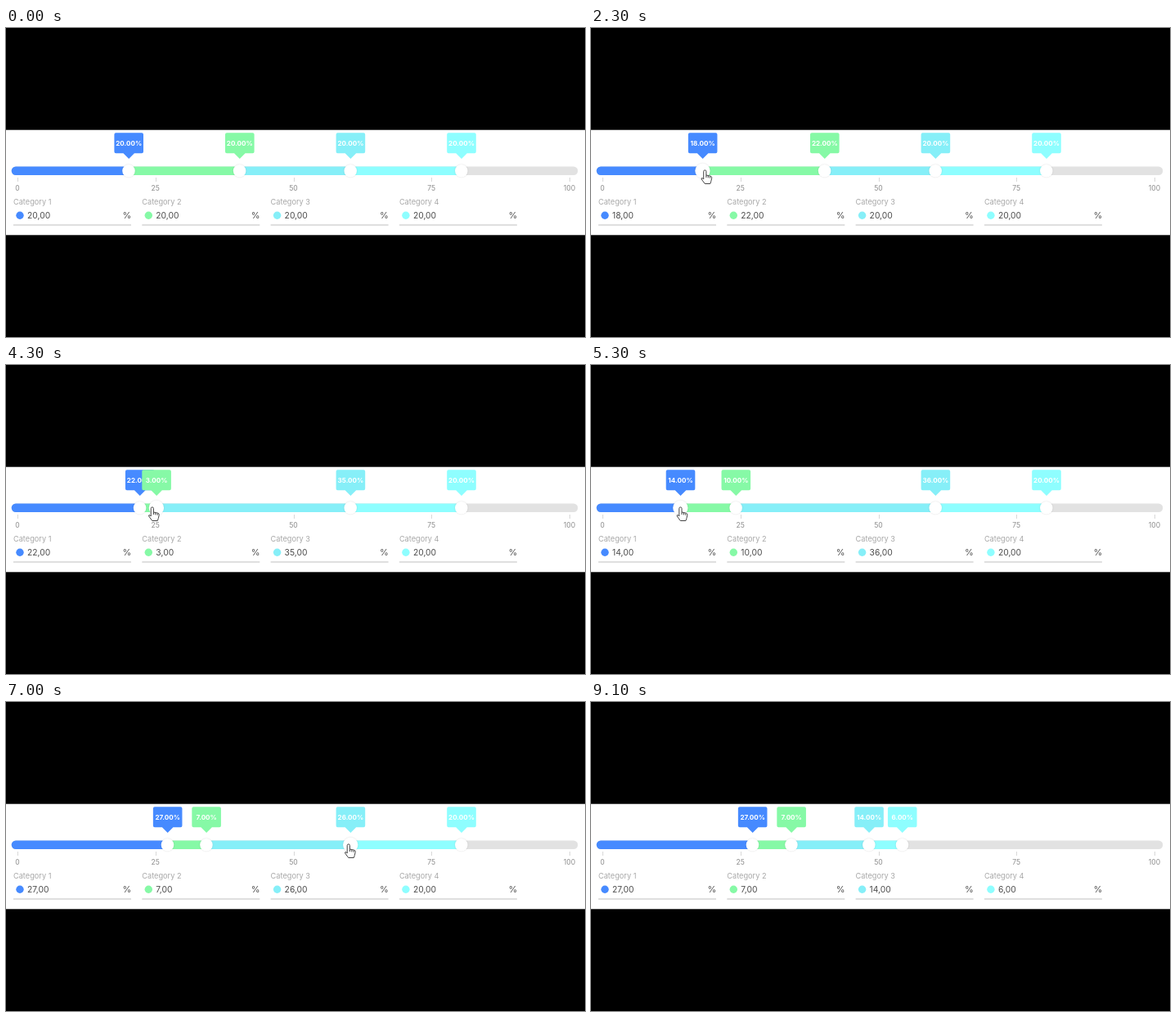
Write an HTML page with a canvas that moves like this. It is 708 by 378 pixels and loops after 9400 ms.

```html
<!DOCTYPE html>
<html lang="en">
<head>
<meta charset="utf-8">
<title>Category slider</title>
<style>
html, body { margin: 0; height: 100%; overflow: hidden; background: #000; }
canvas { display: block; }
</style>
</head>
<body>
<canvas id="stage" width="708" height="378"></canvas>
<script>
const ctx = document.getElementById('stage').getContext('2d');
const LOOP = 9400, STEP = 100, ENTER = 900, LEAVE = 9000;
const COLORS = ['#468aff', '#86f9a6', '#86eff8', '#8efeff'];
const MID = 174.7;

// Drags in order: handle, start, end, value reached
const DRAGS = [
  [0, 1100, 1900, 12],
  [0, 1900, 2600, 22],
  [1, 2800, 3800, 60],
  [1, 3800, 4350, 24],
  [0, 4900, 5300, 14],
  [1, 5700, 6200, 34],
  [0, 6400, 6800, 27],
  [2, 6950, 7700, 48],
  [3, 7900, 8700, 54]
];

const HAND = new Path2D('M-2 1.5a1.6 1.6 0 0 1 3.2 0V6l5.3 1.2q1.8.5 1.5 2.3l-.9 4-1 3H-.5l-4-5.5q-.7-1.6 1.2-1.4L-2 11z');
const KNUCKLES = new Path2D('M1.2 6v3M3.6 7v2.4M5.9 7.5v2.2');

const sliderX = value => 14.4 + 6.78 * value;
const mix = (a, b, k) => a + (b - a) * k;

function ease(t, from, to) {
  const k = Math.min(1, Math.max(0, (t - from) / (to - from)));
  return k * k * (3 - 2 * k);
}

// Plays the drags up to time t; between drags the pointer glides to the next handle
function stateAt(t) {
  const handles = [20, 40, 60, 80];
  let pointer = 24, idleSince = ENTER, active = -1;
  for (const [i, from, to, target] of DRAGS) {
    if (t < from) {
      pointer = mix(pointer, handles[i], ease(t, idleSince, from));
      break;
    }
    pointer = handles[i] = mix(handles[i], target, ease(t, from, to));
    idleSince = to;
    if (t <= to) {
      active = i;
      break;
    }
  }
  return { handles: handles.map(Math.round), pointer, active };
}

function text(str, x, y, size, color, align = 'left', weight = 400) {
  ctx.font = `${weight} ${size}px Inter, sans-serif`;
  ctx.fillStyle = color;
  ctx.textAlign = align;
  ctx.fillText(str, x, y);
}

function circle(x, y, r, color) {
  ctx.fillStyle = color;
  ctx.beginPath();
  ctx.arc(x, y, r, 0, 2 * Math.PI);
  ctx.fill();
}

function drawTrack(handles) {
  ctx.save();
  ctx.beginPath();
  ctx.roundRect(6.7, MID - 5.2, 692.6, 10.4, 5.2);
  ctx.clip();
  ctx.fillStyle = '#e2e2e2';
  ctx.fillRect(0, 160, 708, 30);
  let left = 0;
  handles.forEach((value, i) => {
    const right = sliderX(value);
    ctx.fillStyle = COLORS[i];
    ctx.fillRect(left, 160, right - left, 30);
    left = right;
  });
  ctx.restore();
  for (let n = 0; n <= 100; n += 25) {
    const x = 14 + 6.75 * n;
    ctx.fillStyle = '#d8d8d8';
    ctx.fillRect(Math.round(x), 183, 1, 5);
    text(n, x, 196.5, 8.6, '#8c8c8c', 'center');
  }
}

function drawKnob(value, active) {
  ctx.save();
  ctx.shadowColor = 'rgba(0,0,0,.14)';
  ctx.shadowBlur = 2;
  circle(sliderX(value), MID, active ? 9.2 : 7.8, '#fff');
  ctx.restore();
}

function drawBubble(value, share, color) {
  const x = sliderX(value) + 0.2;
  ctx.fillStyle = color;
  ctx.beginPath();
  ctx.roundRect(x - 17.8, 128.2, 35.6, 25, 2);
  ctx.moveTo(x - 7, 153);
  ctx.lineTo(x + 7, 153);
  ctx.lineTo(x, 160);
  ctx.fill();
  text(share.toFixed(2) + '%', x, 141.5, 8.1, '#fff', 'center', 700);
}

function drawField(i, share) {
  const x = 9 + 157.3 * i;
  text('Category ' + (i + 1), x, 213.5, 9.2, '#a8a8a8');
  circle(x + 8, 229.3, 4.7, COLORS[i]);
  text(share.toFixed(2).replace('.', ','), x + 17, 230, 10.3, '#4c4c4c');
  text('%', x + 144.3, 230, 11, '#4c4c4c', 'right');
  ctx.fillStyle = '#c0c0c0';
  ctx.fillRect(x, 240.5, 144, 1);
}

function drawHand(x, y) {
  ctx.save();
  ctx.translate(x, y);
  ctx.lineJoin = 'round';
  ctx.fillStyle = '#fff';
  ctx.strokeStyle = '#444';
  ctx.fill(HAND);
  ctx.stroke(HAND);
  ctx.stroke(KNUCKLES);
  ctx.restore();
}

function draw(t) {
  const { handles, active } = stateAt(t);
  ctx.fillStyle = '#000';
  ctx.fillRect(0, 0, 708, 378);
  ctx.fillStyle = '#fff';
  ctx.fillRect(0, 124.7, 708, 128.6);
  ctx.textBaseline = 'middle';
  drawTrack(handles);
  handles.forEach((value, i) => {
    const share = value - (handles[i - 1] || 0);
    drawKnob(value, i === active);
    drawBubble(value, share, COLORS[i]);
    drawField(i, share);
  });
  if (t >= ENTER && t < LEAVE) {
    // The pointer runs slightly ahead of the handle it drags
    const { pointer } = stateAt(t + 20);
    const drop = 30 * (1 - ease(t, ENTER, 1100)) + 35 * ease(t, 8700, LEAVE);
    drawHand(sliderX(pointer), 174 + drop);
  }
}

const begin = performance.now();
function tick() {
  const t = (performance.now() - begin) % LOOP;
  draw(Math.floor(t / STEP) * STEP);
  requestAnimationFrame(tick);
}
tick();
</script>
</body>
</html>
```
